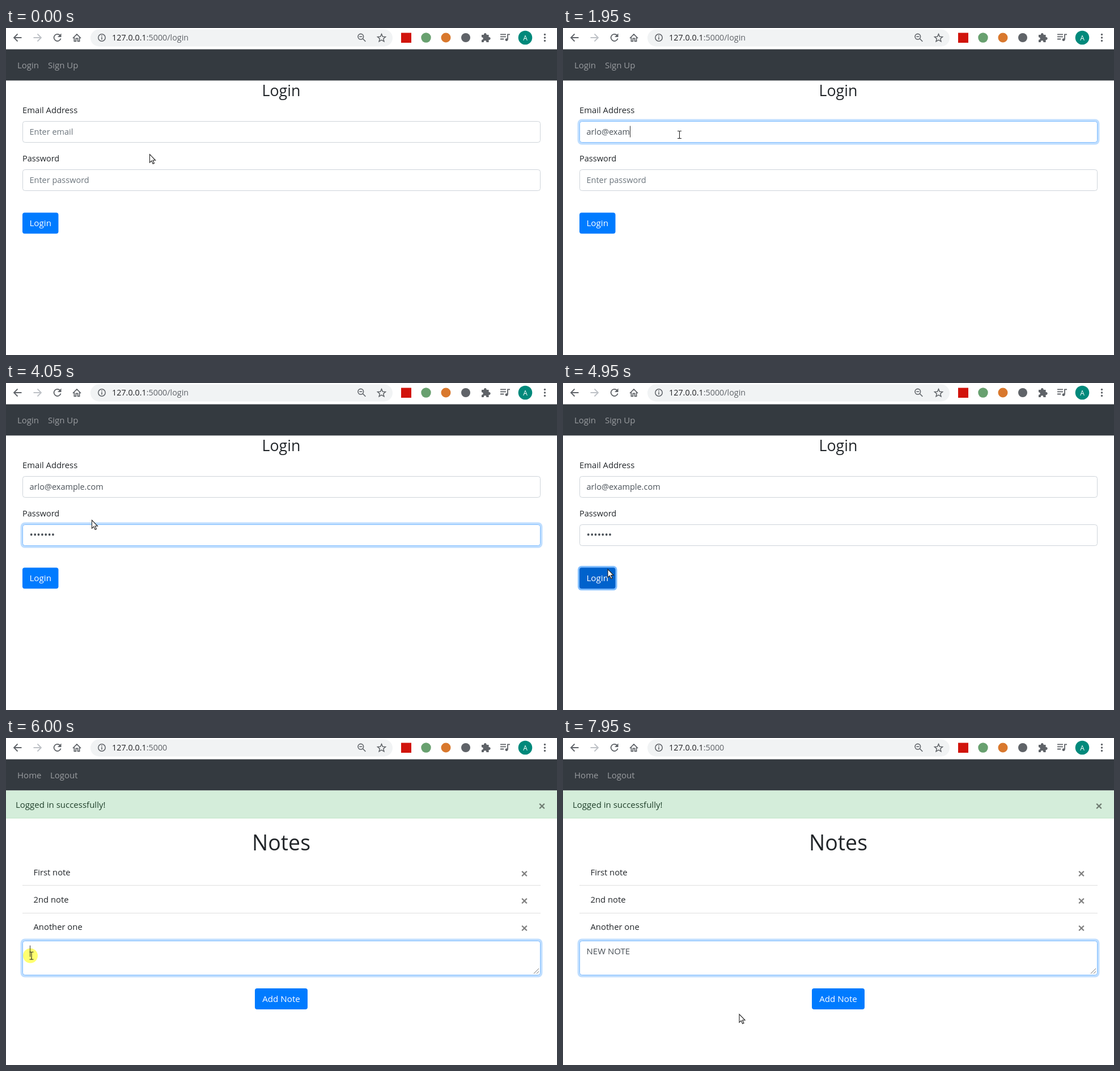
An HTML page that plays this animation: 972 by 576 pixels, repeating every 8 s.

```html
<!DOCTYPE html>
<html lang="en">
<head>
<meta charset="utf-8">
<title>Notes login</title>
<style>
  html, body { margin: 0; width: 100%; height: 100%; overflow: hidden; background: #fff; }
  svg { display: block; width: 972px; height: 576px; font-family: "Open Sans", "Noto Sans", sans-serif; }
  text { white-space: pre; }
</style>
</head>
<body>
<svg id="stage" viewBox="0 0 972 576"></svg>
<script>
const LOOP = 8000, STEP = 150;
const EMAIL = 'arlo@example.com', NOTE = 'NEW NOTE';
const stage = document.getElementById('stage');
const pen = document.createElement('canvas').getContext('2d');

const clamp = v => Math.max(0, Math.min(1, v));
const ramp = (t, start, len = 150) => clamp((t - start) / len);
const within = (t, a, b) => t >= a && t < b;
const typed = (s, t, start, gap) => s.slice(0, Math.max(0, Math.floor((t - start) / gap)));

const text = (x, y, s, fill = '#212529', size = 14.8, extra = '') =>
  `<text x="${x}" y="${y}" fill="${fill}" font-size="${size}" ${extra}>${s}</text>`;
const rect = (x, y, w, h, fill, extra = '') =>
  `<rect x="${x}" y="${y}" width="${w}" height="${h}" fill="${fill}" ${extra}/>`;
const circle = (x, y, r, fill, extra = '') =>
  `<circle cx="${x}" cy="${y}" r="${r}" fill="${fill}" ${extra}/>`;
const line = (d, color, width = 1.8, extra = '') =>
  `<path d="${d}" fill="none" stroke="${color}" stroke-width="${width}" ${extra}/>`;
const title = (y, s, size) => text(485.5, y, s, '#212529', size, 'text-anchor="middle" font-weight="500"');
const cross = (x, y, color) => line(`M${x - 4.3} ${y - 4.3}l8.6 8.6m0-8.6l-8.6 8.6`, color, 2.3);

function chrome(path) {
  const ink = '#5f6368';
  return rect(149, 2.5, 533, 30, '#f1f3f4', 'rx="15"')
    + line('M27.5 17H14.5M20.5 10.5L14 17l6.5 6.5', ink)
    + line('M48.5 17h13M55.5 10.5L62 17l-6.5 6.5', '#bdc1c6')
    + line('M95.2 12.8A6.1 6.1 0 1 0 96.6 18.5', ink)
    + `<path d="M97.5 9.5v6.5h-6.5z" fill="${ink}"/>`
    + line('M118 18l7-7 7 7M120.4 16.5V23.3h3v-5h3.2v5h3V16.5', ink, 1.7)
    + circle(169, 17, 6.2, 'none', `stroke="${ink}" stroke-width="1.5"`)
    + line('M169 16v4.5M169 13v1.7', ink, 1.6)
    + text(187, 22, `127.0.0.1<tspan fill="${ink}">:5000${path}</tspan>`, '#202124', 14.35)
    + circle(625.8, 15.2, 4.8, 'none', `stroke="${ink}" stroke-width="1.6"`)
    + line('M629.3 18.7l5 5M623.3 15.2h5', ink, 1.6)
    + line('M662.5 10.6l2 4.6 5 .4-3.8 3.3 1.2 4.9-4.4-2.6-4.4 2.6 1.2-4.9-3.8-3.3 5-.4z', ink, 1.5)
    + rect(697, 8.5, 18, 17.5, '#d1140c')
    + circle(741, 17, 8.7, '#68a06f')
    + circle(776, 17, 8.5, '#d9782d')
    + circle(811, 17, 8, ink)
    + `<path d="M839 12h4a2.4 2.4 0 1 1 4.6 0h4v4.2a2.4 2.4 0 1 1 0 4.6V25h-4.3a2.3 2.3 0 1 0-4.4 0H839v-4.3a2.3 2.3 0 1 0 0-4.5z" fill="${ink}"/>`
    + line('M872 11.3h10M872 15.4h10M872 19.5h6.3M885 20.5V11.3h4', ink)
    + circle(883, 20.7, 2.4, ink)
    + circle(916, 17, 12.3, '#00897b')
    + text(916, 21.5, 'A', '#fff', 12, 'text-anchor="middle"')
    + [11.5, 17, 22.5].map(y => circle(950.5, y, 1.7, ink)).join('');
}

function navbar(first, second, x) {
  const gray = '#9a9da0';
  return rect(0, 37.5, 972, 55, '#343a40') + text(20, 71, first, gray, 15) + text(x, 71, second, gray, 15);
}

// focus runs from 0 (plain border) to 1 (full blue glow)
function field(y, h, focus, value, hint, caret, size = 14.5) {
  const mix = (a, b) => Math.round(a + (b - a) * focus);
  const border = `rgb(${mix(206, 128)},${mix(212, 189)},${mix(218, 255)})`;
  const g = 3.4 * focus, base = y + 23.5;
  let out = '';
  if (focus) out += rect(29 - g, y - g, 914 + 2 * g, h + 1 + 2 * g, `rgba(0,123,255,${0.25 * focus})`, `rx="${4 + g}"`);
  out += rect(29.5, y + .5, 913, h, '#fff', `rx="4" stroke="${border}"`);
  out += value ? text(41.5, base, value, '#495057', size) : text(41.5, base, hint, '#6c757d', 14.5);
  if (caret) {
    pen.font = `${size}px "Open Sans", "Noto Sans", sans-serif`;
    const x = Math.round(41.5 + pen.measureText(value).width) + .5;
    out += line(`M${x} ${base - 15}v20`, '#333', 1);
  }
  return out;
}

function button(x, y, w, label, fill = '#007bff', ring = 0) {
  return (ring ? rect(x - 3, y - 3, w + 6, 43, '#80bdff', 'rx="6.5"') : '')
    + rect(x, y, w, 37, fill, 'rx="4"')
    + text(x + w / 2, y + 23.7, label, '#fff', 15.2, 'text-anchor="middle"');
}

function loginPage(t) {
  const leave = ramp(t, 3030);
  const emailFocus = Math.min(ramp(t, 400), 1 - leave);
  const passFocus = Math.min(leave, 1 - ramp(t, 4650));
  const fill = t >= 4800 ? '#0062cc' : t >= 4650 ? '#0069d9' : '#007bff';
  return chrome('/login') + navbar('Login', 'Sign Up', 74)
    + title(119.5, 'Login', 26.8)
    + text(29, 150, 'Email Address')
    + field(164, 37, emailFocus, typed(EMAIL, t, 600, 150), 'Enter email', within(t, 450, 3150))
    + text(29, 235, 'Password', '#212529', 14.5)
    + field(249, 37, passFocus, typed('•'.repeat(7), t, 3150, 55), 'Enter password', within(t, 3150, 4035), 17)
    + button(29, 325.3, 63.5, 'Login', fill, t >= 4800);
}

function notesPage(t) {
  const notes = ['First note', '2nd note', 'Another one'];
  return chrome('') + navbar('Home', 'Logout', 78)
    + rect(0, 92.5, 972, 49, '#d4edda') + rect(0, 140.5, 972, 1, '#c3e6cb')
    + text(17, 123, 'Logged in successfully!', '#20402b', 15)
    + cross(945.5, 120, '#6f7c72')
    + title(197.5, 'Notes', 37.5)
    + notes.map((s, i) => text(48.5, 242 + 48 * i, s) + cross(914.5, 239 + 48 * i, '#7f7f7f')).join('')
    + rect(29, 259, 914, 1, '#dfdfdf') + rect(29, 308, 914, 1, '#dfdfdf')
    + field(357, 60, ramp(t, 5700), typed(NOTE, t, 6450, 150), '', within(t, 5850, 7800), 15)
    + line('M931 415l9-9M936 415l4-4', '#777', 1)
    + button(439, 441, 93, 'Add Note');
}

// time, x, y of the pointer's hot spot
const path = [
  [0, 253, 222], [450, 205.5, 188], [3750, 205.5, 188], [4050, 151, 241], [4200, 123, 286],
  [4650, 78.5, 327.5], [5250, 78.5, 327.5], [5850, 45, 383.5], [6150, 45, 383.5],
  [6300, 85, 476], [6450, 85, 476], [6750, 189, 514], [7350, 189, 514], [7800, 310.5, 486], [LOOP, 310.5, 486]
];
const clicks = [450, 4650, 5850];

function pointer(t) {
  const i = path.findIndex(p => p[0] > t), [t0, x0, y0] = path[i - 1], [t1, x1, y1] = path[i];
  const k = (t - t0) / (t1 - t0), x = x0 + (x1 - x0) * k, y = y0 + (y1 - y0) * k;
  const fields = t < 5100 ? [[164, 202], [249, 287]] : [[357, 418]];
  const beam = fields.some(([top, bottom]) => within(y, top, bottom));
  const glow = clicks.some(c => within(t, c, c + 300))
    ? circle(x - 2, y, 13, '#ffff70', 'style="mix-blend-mode:multiply"') : '';
  const shape = beam
    ? line('M-3.5-6.5h2.5q1 0 1 1q0-1 1-1h2.5M0-6V6M-3.5 6.5h2.5q1 0 1-1q0 1 1 1h2.5', '#222', 1.1)
    : '<path d="M.5.5V15l3.3-3.1 2.4 5.3 2.3-1-2.4-5.2h4.5z" fill="#fff" stroke="#222" stroke-width="1.1"/>';
  return glow + `<g transform="translate(${x} ${y})">${shape}</g>`;
}

let shown = -1;
function draw(now) {
  const t = Math.floor(now % LOOP / STEP) * STEP;
  if (t !== shown) {
    stage.innerHTML = (t < 5100 ? loginPage(t) : notesPage(t)) + pointer(t);
    shown = t;
  }
}
const start = performance.now();
function tick() {
  draw(performance.now() - start);
  requestAnimationFrame(tick);
}
tick();
</script>
</body>
</html>
```
